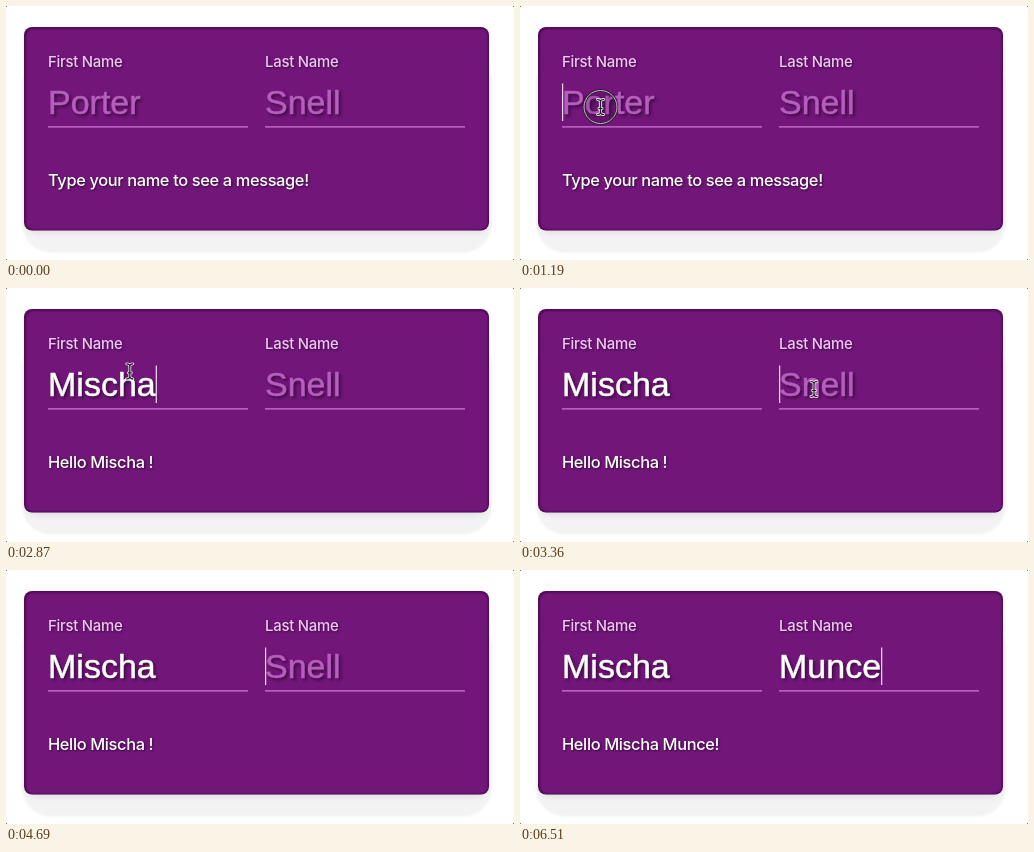
An HTML page for the animation above (6.72 s loop, 508 by 254 pixels).

```html
<!DOCTYPE html>
<html lang="en">
<head>
<meta charset="utf-8">
<title>Greeting form</title>
<style>
html, body { margin: 0; width: 100%; height: 100%; overflow: hidden; background: #fff; }
svg { display: block; width: 100vw; height: 100vh; }
.label, .msg { font-family: Inter, sans-serif; font-weight: 500; }
.label { font-size: 14.9px; letter-spacing: -.25px; fill: #f2c6f4; filter: drop-shadow(1px 1px 1px rgba(0,0,0,.5)); }
.msg { font-size: 16.4px; letter-spacing: -.36px; fill: #fff; filter: drop-shadow(1.5px 1.5px 1px rgba(0,0,0,.55)); }
.field { font: 34px "Liberation Sans", Arial, sans-serif; fill: #fff; stroke: #fff; stroke-width: .5; filter: drop-shadow(2px 2px 1.5px rgba(0,0,0,.45)); }
.field.empty { fill: #b65dbe; stroke: #b65dbe; }
.line { fill: #b65dbe; }
</style>
</head>
<body>
<svg viewBox="0 0 508 254">
  <defs>
    <filter id="soft" x="-10%" y="-10%" width="120%" height="120%"><feGaussianBlur stdDeviation=".8"/></filter>
    <filter id="blur" x="-10%" y="-10%" width="120%" height="120%"><feGaussianBlur stdDeviation="3"/></filter>
    <clipPath id="card"><rect x="18" y="21" width="465" height="203.6" rx="8"/></clipPath>
  </defs>
  <rect width="508" height="254" fill="#fff"/>
  <path d="M0 0h1v1h-1zM507 0h1v1h-1zM0 253h1v1h-1zM507 253h1v1h-1z" fill="#777"/>
  <rect x="16" y="50" width="470" height="196.5" rx="29" fill="#f3f3f3" filter="url(#soft)"/>
  <rect x="20" y="40" width="461" height="187" rx="10" fill="#000" opacity=".08" filter="url(#blur)"/>
  <g clip-path="url(#card)">
    <rect x="18" y="21" width="465" height="204" fill="#4e0a54"/>
    <rect x="20" y="23" width="461.8" height="200.6" rx="7" fill="#72137a" filter="url(#soft)"/>
  </g>
  <text class="label" x="42" y="61">First Name</text>
  <text class="label" x="259" y="61">Last Name</text>
  <rect class="line" x="42" y="120" width="200" height="1.7"/>
  <rect class="line" x="259" y="120" width="200" height="1.7"/>
  <text class="field" id="first" x="42" y="108"></text>
  <text class="field" id="last" x="259" y="108"></text>
  <text class="msg" id="msg" x="42" y="180"></text>
  <rect id="caret" y="77.5" width="1.2" height="37.5" fill="#f3dcf5"/>
  <g id="pointer">
    <g id="ring" fill="none">
      <circle id="halo" fill="#000" fill-opacity=".1" stroke="#2a1a2c" stroke-width="2.6"/>
      <circle id="rim" stroke="#cdbfcf" stroke-width="1"/>
    </g>
    <g id="beam" fill="none" stroke-linecap="round">
      <path id="bar" d="M-3 -7.5Q0 -7.5 0 -5Q0 -7.5 3 -7.5M0 -5V5M-3 7.5Q0 7.5 0 5Q0 7.5 3 7.5M-1.5 1.5H1.5"/>
      <use href="#bar" stroke="#e6dce8" stroke-width="2.9"/>
      <use href="#bar" stroke="#222" stroke-width="1.2"/>
    </g>
    <path id="arrow" d="M0 0V14.5L3.4 11.4L5.8 17L8.2 16L5.8 10.5H10.3Z" fill="#111" stroke="#fff" stroke-width="1.1" stroke-linejoin="round"/>
  </g>
</svg>
<script>
const LOOP = 6720, STEP = 70;
const el = id => document.getElementById(id);
const show = (id, on) => el(id).setAttribute("visibility", on ? "inherit" : "hidden");

// [time, value] pairs: the latest one reached applies
const firstKeys = [[0, ""], [1750, "M"], [2240, "Mi"], [2310, "Mis"], [2450, "Misc"], [2520, "Misch"], [2660, "Mischa"]];
const lastKeys = [[0, ""], [3850, "m"], [3990, "mu"], [4130, "mun"], [4480, "mu"], [4620, "m"], [4690, ""],
  [5040, "M"], [5180, "Mu"], [5320, "Mun"], [5390, "Munc"], [5460, "Munce"]];
const at = (keys, t) => keys.reduce((v, k) => t >= k[0] ? k[1] : v, "");

// pointer moves: start, end, time visible, then four Bezier points
const moves = [
  { from: 0, to: 630, show: 70, hide: 1750, p: [[214, 226], [150, 40], [85, 35], [80.5, 101]] },
  { from: 2730, to: 3220, show: 2800, hide: 3850, p: [[80.5, 101], [150, 64], [240, 64], [294, 101]] },
  { from: 5810, to: 6160, show: 5880, hide: 6160, p: [[294, 101], [295, 140], [300, 200], [304, 262]] }
];
// clicks: start, end, radius
const clicks = [[630, 770, 23], [1190, 1260, 17], [3290, 3360, 17]];

const ease = u => u * u * (3 - 2 * u);
function bezier(p, u) {
  const v = 1 - u, w = [v * v * v, 3 * v * v * u, 3 * v * u * u, u * u * u];
  return [0, 1].map(i => w.reduce((s, k, n) => s + k * p[n][i], 0));
}

function setField(id, value, hint) {
  const node = el(id);
  node.textContent = value || hint;
  node.classList.toggle("empty", !value);
  return value ? node.getComputedTextLength() : 0;
}

function drawPointer(t) {
  const m = moves.find(m => t >= m.show && t < m.hide);
  show("pointer", m);
  if (!m) return;
  const u = Math.min(1, (t - m.from) / (m.to - m.from));
  const [x, y] = bezier(m.p, ease(u));
  el("pointer").setAttribute("transform", `translate(${x.toFixed(2)} ${y.toFixed(2)})`);
  const overField = y > 76 && y < 122 && (x < 242 || x > 259);
  show("beam", overField);
  show("arrow", !overField);
  const c = clicks.find(c => t >= c[0] && t < c[1]);
  show("ring", c);
  if (c) {
    el("halo").setAttribute("r", c[2] - 0.5);
    el("rim").setAttribute("r", c[2] - 0.5);
  }
}

function draw(time) {
  const t = Math.floor(time % LOOP / STEP) * STEP;
  const first = at(firstKeys, t), last = at(lastKeys, t);
  const w1 = setField("first", first, "Porter");
  const w2 = setField("last", last, "Snell");
  el("msg").textContent = first || last ? `Hello ${first} ${last}!` : "Type your name to see a message!";
  el("caret").setAttribute("x", t < 3290 ? 42 + w1 : 259 + w2);
  show("caret", t >= 1190 && !(t >= 6020 && t < 6510));
  drawPointer(t);
}

const start = performance.now();
function tick() {
  draw(performance.now() - start);
  requestAnimationFrame(tick);
}
tick();
</script>
</body>
</html>
```
